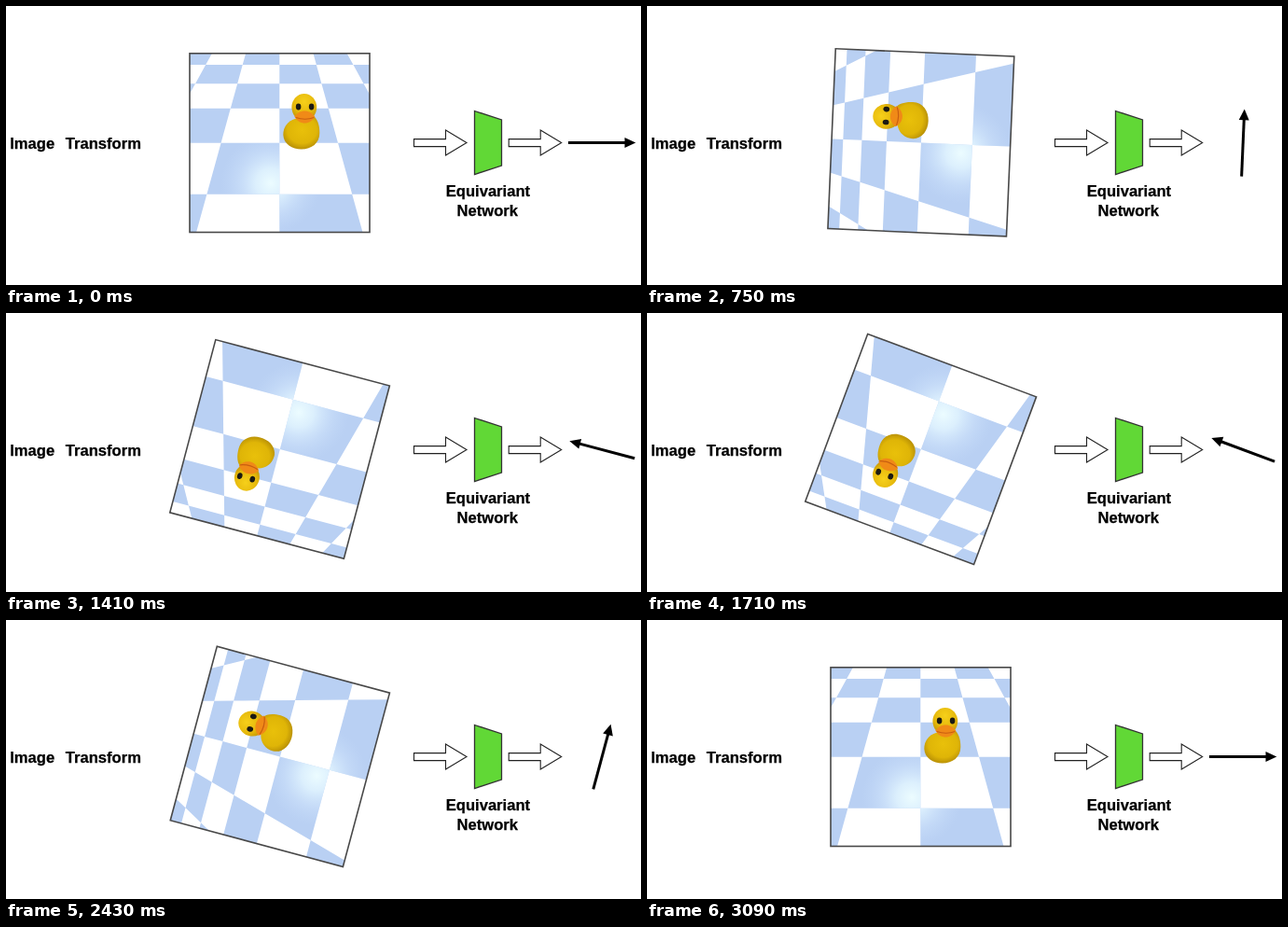
An HTML page for the animation above (3120 ms loop, 681 by 299 pixels).

```html
<!DOCTYPE html>
<html lang="en">
<head>
<meta charset="utf-8">
<title>Equivariant network</title>
<style>
  html, body { margin: 0; width: 100%; height: 100%; overflow: hidden; background: #fff; }
  svg { display: block; }
  text { font: bold 16.6px "Liberation Sans", Arial, sans-serif; stroke: #000; stroke-width: .25px; }
</style>
</head>
<body>
<svg width="681" height="299" viewBox="0 0 681 299">
  <defs>
    <clipPath id="frame"><rect x="197" y="50.800" width="193" height="191.700"/></clipPath>
    <radialGradient id="shine" gradientUnits="userSpaceOnUse" cx="284" cy="190" r="54">
      <stop offset="0" stop-color="#ecfcff"/>
      <stop offset=".3" stop-color="#e2f5ff" stop-opacity=".85"/>
      <stop offset=".65" stop-color="#d4e8fd" stop-opacity=".4"/>
      <stop offset="1" stop-color="#c8defa" stop-opacity="0"/>
    </radialGradient>
    <radialGradient id="body" cx=".52" cy=".42" r=".62">
      <stop offset="0" stop-color="#e9c00a"/>
      <stop offset=".65" stop-color="#dfb507"/>
      <stop offset="1" stop-color="#b28a05"/>
    </radialGradient>
    <radialGradient id="head" cx=".5" cy=".3" r=".72">
      <stop offset="0" stop-color="#f6d01a"/>
      <stop offset=".6" stop-color="#e6b90c"/>
      <stop offset="1" stop-color="#bd9006"/>
    </radialGradient>
  </defs>

  <text x="4.2" y="153">Image</text>
  <text x="63.8" y="153">Transform</text>
  <g text-anchor="middle">
    <text x="516.900" y="204">Equivariant</text>
    <text x="516.300" y="225">Network</text>
  </g>

  <g id="picture">
    <g clip-path="url(#frame)">
      <rect x="197" y="50" width="193" height="193" fill="#fff"/>
      <path id="floor" fill="#b9d0f3"/>
      <use href="#floor" id="gloss"/>
      <path id="glossy" fill="url(#shine)"/>
      <g transform="translate(.8 0)">
        <path d="M309 121C302 123 296.500 129 296.500 138C297 148 306 153.500 316 153.500C327 153.500 335.500 147 335.500 136C335.500 127 333 121 329 118Z" fill="url(#body)"/>
        <ellipse cx="319" cy="108.500" rx="13.400" ry="14.600" fill="url(#head)"/>
        <path d="M308.500 118.500C312 114 316 112.500 319.500 112.500C323 112.500 327 114 330.500 118.500C328 123 324 125.500 319.500 125.500C315 125.500 311 123 308.500 118.500Z" fill="#f08a17"/>
        <path d="M310 119.500Q320 123 329.500 119.500" fill="none" stroke="#c85e10" stroke-width="1.2"/>
        <g fill="#1c1a12">
          <ellipse cx="312.800" cy="108" rx="2.8" ry="3.4"/>
          <ellipse cx="326.800" cy="108" rx="2.8" ry="3.4"/>
        </g>
      </g>
    </g>
    <rect x="197" y="50.800" width="193" height="191.700" fill="none" stroke="#484848" stroke-width="1.6"/>
  </g>

  <g fill="#fff" stroke="#222" stroke-width="1.1">
    <path id="block" d="M437.500 142.600H471.500V133L494 146.500L471.500 160V150.600H437.500Z"/>
    <use href="#block" x="101.700"/>
  </g>
  <path d="M502.500 112.500L531.500 122V171L502.500 180.500Z" fill="#61d836" stroke="#333" stroke-width="1.3"/>

  <g id="pointer">
    <path d="M603 146.500H665" stroke="#000" stroke-width="3"/>
    <path d="M663.500 141L675.300 146.500L663.500 152Z"/>
  </g>
</svg>
<script>
  const LOOP = 3120, STEP = 30;
  const START = 6, PEAK = 1536, END = 3068;
  const HORIZON = -80, CENTER_X = 293.3, TILE = 0.2766;
  const byId = id => document.getElementById(id);

  // Checkerboard in perspective: equal depth steps are equal steps of 1 / (y - horizon).
  const lineY = row => HORIZON + 1 / (0.00355 + 0.00086 * row);
  const corner = (col, row) => {
    const y = lineY(row);
    return `${(CENTER_X + col * TILE * (y - HORIZON)).toFixed(2)} ${y.toFixed(2)}`;
  };

  let tiles = "";
  for (let row = -1; row < 5; row++) {
    for (let col = -4; col < 4; col++) {
      if ((row + col) % 2 === 0) continue;
      tiles += `M${corner(col, row)}L${corner(col + 1, row)}L${corner(col + 1, row + 1)}L${corner(col, row + 1)}Z`;
    }
  }
  byId("gloss").remove();
  for (const id of ["floor", "glossy"]) byId(id).setAttribute("d", tiles);

  function angleAt(t) {
    const part = t < PEAK ? (t - START) / (PEAK - START) : (END - t) / (END - PEAK);
    return 180 * Math.max(0, part);
  }

  function draw(time) {
    const t = Math.floor((time % LOOP) / STEP) * STEP;
    const angle = -angleAt(t);
    byId("picture").setAttribute("transform", `rotate(${angle} 293.5 146.3)`);
    byId("pointer").setAttribute("transform", `rotate(${angle} 639.2 146.5)`);
  }

  let origin;
  function tick(now) {
    origin ??= now;
    draw(now - origin);
    requestAnimationFrame(tick);
  }
  draw(0);
  requestAnimationFrame(tick);
</script>
</body>
</html>
```
